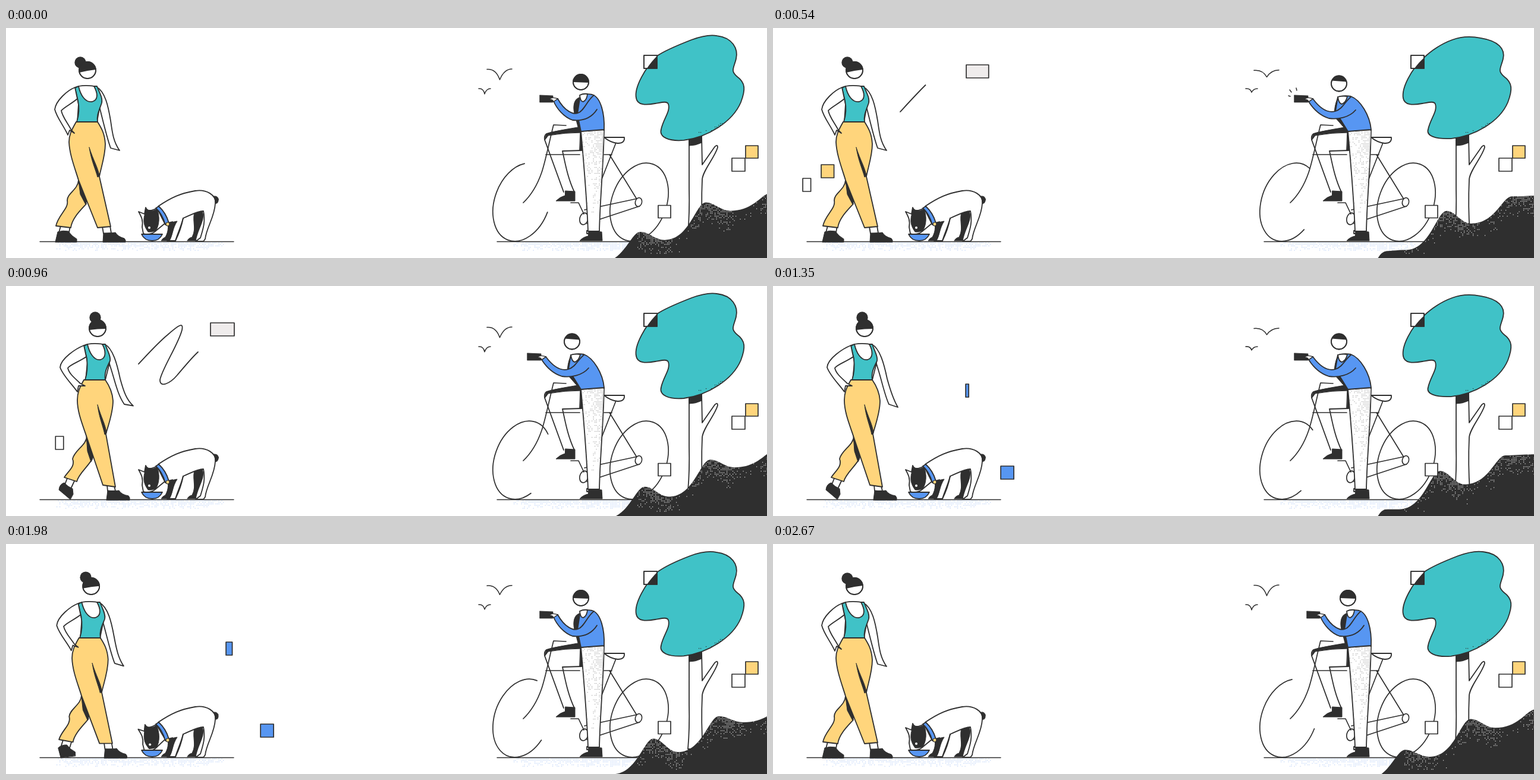
Animation, 1280 px wide and 387 px high, one loop 2.7 s. Source, as an HTML page with a canvas:

```html
<!DOCTYPE html>
<html>
<head>
<meta charset="utf-8">
<style>
html, body { margin: 0; width: 100%; height: 100%; overflow: hidden; background: #fff; }
canvas { display: block; }
</style>
</head>
<body>
<canvas id="stage" width="1280" height="387"></canvas>
<script>
const g = document.getElementById('stage').getContext('2d');
const LOOP = 2700, TAU = Math.PI * 2;
const INK = '#2f2f2f', TEAL = '#40c2c7', SUN = '#ffd57c', BLUE = '#5796f2', PAPER = '#fff';

// Piecewise interpolation over [position, value] pairs.
function key(t, pairs, smooth) {
  if (t <= pairs[0][0]) return pairs[0][1];
  for (let i = 1; i < pairs.length; i++) {
    const [a, u] = pairs[i - 1], [b, v] = pairs[i];
    if (t <= b) {
      let k = (t - a) / (b - a);
      if (smooth) k = k * k * (3 - 2 * k);
      return u + (v - u) * k;
    }
  }
  return pairs[pairs.length - 1][1];
}

const lerp = (a, b, k) => a + (b - a) * k;

// Blend two path strings that share the same commands.
function mix(a, b, k) {
  const other = b.match(/-?[\d.]+/g);
  let i = 0;
  return a.replace(/-?[\d.]+/g, n => lerp(+n, +other[i++], k).toFixed(2));
}

function draw(d, fill, line = 1.8) {
  const p = new Path2D(d);
  if (fill) { g.fillStyle = fill; g.fill(p); }
  if (line) { g.strokeStyle = INK; g.lineWidth = line; g.stroke(p); }
  return p;
}

function oval(x, y, rx, ry, fill, line = 1.8, rot = 0, from = 0, to = TAU) {
  g.beginPath();
  g.ellipse(x, y, rx, ry, rot, from, to);
  if (fill) { g.fillStyle = fill; g.fill(); }
  if (line) { g.strokeStyle = INK; g.lineWidth = line; g.stroke(); }
}

function box(x, y, w, h, fill) {
  if (w < 0.4) return;
  g.fillStyle = fill;
  g.fillRect(x, y, w, h);
  g.lineWidth = 1.7;
  g.strokeStyle = INK;
  g.strokeRect(x, y, w, h);
}

function clipped(path, body) {
  g.save();
  g.clip(path);
  body();
  g.restore();
}

function hash(x, y) {
  const s = Math.sin(x * 12.99 + y * 78.23) * 43758.55;
  return s - Math.floor(s);
}

// Halftone grain; density(x, y) gives the chance of a dot.
function grain(x0, y0, x1, y1, step, color, density) {
  g.fillStyle = color;
  for (let y = y0; y < y1; y += step)
    for (let x = x0; x < x1; x += step)
      if (hash(x, y) < density(x, y)) g.fillRect(x, y, 1.2, 1.2);
}

function head(x, y, r, left, right, bow) {
  oval(x, y, r, r, PAPER);
  const p = new Path2D();
  p.arc(x, y, r, 0, TAU);
  clipped(p, () => draw(`M${x - 20},${y - 20}L${x + 20},${y - 20}L${x + r},${y + right}` +
    `Q${x},${y + (left + right) / 2 + bow} ${x - r},${y + left}L${x - 20},${y + left}Z`, INK, 0));
  oval(x, y, r, r, null);
}

function ground(x0, x1) {
  grain(x0 + 28, 361, x1 - 14, 374, 2.5, '#b9d0f7', (x, y) =>
    Math.min(0.9, (x - x0 - 20) / 40, (x1 - 5 - x) / 40) * (1.05 - (y - 361) / 15));
  draw(`M${x0},359.5L${x1},359.5`, null, 1.4);
}

function woman(k, arm) {
  const m = (a, b, fill, line) => draw(mix(a, b, k), fill, line);
  // ankles and shoes
  m('M92,333L89,344L106,344L108,333Z', 'M104,321L99,334L109,341L116,326Z', PAPER);
  m('M162,334L164,346L177,345L175,333Z', 'M170,335L171,345L184,345L182,336Z', PAPER);
  m('M83,360L87,343Q96,340 105,342Q110,350 119,355L119,360Z',
    'M108,359L89,343Q90,333 98,331Q104,338 112,341Q113,350 120,355L119,360Z', INK, 1);
  m('M163,360L164,345Q174,346 184,344Q188,351 199,354Q202,357 201,360Z',
    'M169,360L171,344Q181,346 190,344Q194,351 206,353Q209,356 208,360Z', INK, 1);
  // trousers
  m('M122,256C121,272 103,278 103,290C106,304 88,314 84,333L109,336C111,320 126,306 135,296Z',
    'M136,252C136,268 115,276 112,291C117,304 104,312 98,322L119,329C122,316 138,304 145,291Z', SUN);
  m('M122,257L125,280L134,297L136,290Z', 'M135,251L137,278L143,296L147,287Z', INK, 1);
  m('M118,158C110,172 106,180 106,192C107,214 116,236 122,256L154,336L176,334L157,250C160,234 167,215 167,195C166,178 161,169 154,158Z',
    'M131,158C123,172 120,180 120,192C120,214 130,236 136,255L163,335L184,338L168,249C172,234 180,214 180,193C179,178 174,168 167,158Z', SUN);
  m('M140,201C143,222 151,239 154,251L157,249C155,235 147,223 140,201Z',
    'M154,200C156,220 164,238 166,250L169,248C168,234 160,221 154,200Z', INK, 1);
  m('M154,240L157,250', 'M165,240L168,249', null);
  // far arm
  const reach = 'M152,99C167,107 172,132 176,156C179,178 181,192 191,206L176,202C170,186 164,160 157,132Z';
  const swung = `M166,98C180,105 187,132 192,156C198,178 203,192 ${210 + arm},${204 - arm * 0.6}L${195 + arm},199C187,182 183,158 174,131Z`;
  draw(mix(reach, swung, k), PAPER);
  // torso
  m('M116,100C124,96 143,96 152,99L158,130L153,158L120,158L122,128Z',
    'M131,100C139,96 158,96 166,99L174,130L167,158L134,158L137,128Z', PAPER);
  m('M116,101L122,98C125,112 133,126 145,124C156,121 154,109 148,98L153,98C157,108 163,118 161,126C157,138 152,147 154,158L119,158C123,146 123,132 121,122Z',
    'M131,101L137,98C140,112 148,126 159,124C169,121 168,109 162,98L167,98C170,108 177,118 175,126C169,138 165,147 167,158L133,158C137,146 137,132 136,122Z', TEAL);
  // near arm
  m('M116,100C103,105 84,122 82,137C86,152 97,164 104,180L107,172L115,177L110,172C104,160 95,150 93,139C98,133 111,127 120,119Z',
    'M131,100C118,105 92,122 91,137C96,151 110,164 120,178L122,168L133,168L125,164C117,156 106,148 104,138C108,132 124,127 135,119Z', PAPER);
  // head
  oval(lerp(125, 150, k), lerp(58, 53, k), 9.7, 9.7, INK, 0);
  head(lerp(137, 154, k), 71, 14, lerp(4, 3, k), lerp(-1, 1, k), -1);
}

function dog(nod, tail) {
  g.save();
  g.translate(351, 290);
  g.rotate(tail);
  draw('M-6,-5Q2,-10 6,-3Q7,6 0,5Z', INK, 1);
  g.restore();
  draw('M330,309C336,322 322,338 319,358L305,358Q308,353 313,352C321,338 313,324 317,311Z', INK, 1.2);
  draw('M256,300C278,285 294,278 318,274C337,271 354,281 352,295C351,318 337,336 335,355L332,359L319,359L327,353C331,340 336,326 332,308C322,308 312,314 298,320C293,338 288,347 285,358L271,358L277,352C280,342 280,334 280,326L268,329Z', PAPER);
  draw('M273,328L288,325C280,337 281,347 275,358L261,358Q264,353 268,352C274,341 272,335 273,328Z', INK, 1);
  draw('M298,320Q294,340 285,358', null);
  g.save();
  g.translate(262, 320);
  g.rotate(nod);
  g.translate(-262, -320);
  draw('M254,303C244,308 238,309 235,302L233,313L223,309C228,318 231,324 229,335L231,346Q242,349 250,343L267,329Z', PAPER);
  draw('M235,303C235,309 249,309 254,304C259,317 258,332 252,341Q245,344 239,343C233,335 230,326 233,315Z', INK, 1);
  oval(241, 336, 2, 2, PAPER, 0);
  g.restore();
  draw('M252,303Q263,313 268,331L274,328Q269,311 257,300Z', BLUE);
  oval(272, 330, 3, 3, SUN, 1.2);
  draw('M228,347L263,347Q258,358 246,358Q233,358 228,347Z', BLUE);
}

function bike(turn) {
  const tilt = -70 * Math.PI / 180, deg = Math.PI / 180;
  oval(868, 293, 68, 46, null, 1.7, tilt, (91 + 43 * turn) * deg, (336.5 + 58 * turn) * deg);
  oval(1065, 293, 68, 46, null, 1.7, tilt);
  draw('M942,164L921,163C914,190 908,222 901,243Q890,275 870,294', null, 1.7);
  draw('M908,213L965,213M1006,213L1019,213M1015,213L1061,288M1026,193L999,262', null, 1.7);
  draw('M1006,184L1040,184Q1041,194 1029,194Q1017,193 1006,184Z', PAPER);
  draw('M1062,287L973,306M1065,300L977,329', null, 1.7);
  oval(1064, 293, 5.5, 7.5, PAPER, 1.7, 0.25);
  oval(972, 321, 7, 10, null, 1.7, 0.25);
  draw('M950,294L963,294L972,313', null, 1.7);
}

function man(k) {
  const m = (a, b, fill, line) => draw(mix(a, b, k), fill, line);
  // raised leg
  draw('M968,168C944,171 922,174 909,178Q905,181 906,188L938,276M936,207L968,206M936,207C941,230 945,253 956,276', null);
  draw('M968,166C944,170 920,174 909,178L906,189L912,181Q940,176 968,176Z', INK, 1);
  draw('M941,274L957,275L957,291L925,291Q932,284 940,282Z', INK, 1);
  draw('M966,172L970,206L965,206Z', INK, 1);
  // standing leg
  draw('M977,341L977,346L997,346L998,341Z', PAPER);
  draw('M980,342L1002,343L1003,358L965,358Q970,352 979,350Z', INK, 1);
  const leg = draw('M967,173L1006,171C1005,230 999,290 998,342L979,342C977,285 972,230 967,173Z', PAPER);
  clipped(leg, () => grain(970, 174, 1006, 330, 2.5, '#a8a8a8', (x, y) =>
    Math.max(0, 1 - (y - 170) / 155) * (x - 966) / 38));
  // torso
  m('M964,117C952,121 954,140 958,151L964,174L971,174L971,128Z',
    'M950,117C946,126 943,139 945,150L966,174L970,174L966,128Z', INK, 1);
  m('M966,113Q976,110 986,112C1001,117 1007,145 1006,171L967,174L961,145Z',
    'M950,116Q961,113 972,115C988,121 1004,147 1006,171L967,174L946,140Z', BLUE);
  m('M965,113Q966,124 971,124Q977,121 978,111Q971,110 965,113Z',
    'M950,116Q952,128 957,128Q964,125 966,115Q957,114 950,116Z', PAPER);
  // arm and camera
  const over = ['M928,119C940,141 955,146 962,143C973,139 977,122 989,113', 'M908,119C922,138 935,143 946,140C958,136 961,125 972,116'];
  const under = 'C985,151 972,157 953,155C938,150 926,135 921,123', under2 = 'C969,151 950,154 935,152C919,147 908,135 901,124';
  m(over[0] + 'L994,137' + under + 'Z', over[1] + 'L980,138' + under2 + 'Z', BLUE, 0);
  m(over[0], over[1], null);
  m('M994,137' + under + 'L928,119', 'M980,138' + under2 + 'L908,119', null);
  m('M898,113L920,114L920,125L898,125Z', 'M877,113L900,114L900,125L877,125Z', INK, 0.8);
  m('M913,121Q918,115 928,119L921,124Q919,119 913,121Z',
    'M893,121Q898,115 908,119L901,124Q899,119 893,121Z', PAPER, 1.4);
  head(lerp(967, 952, k), lerp(91, 93.5, k), 13, lerp(0, -5, k), lerp(1, -3, k), 0);
}

function birds(p) {
  const dip = 2.5 * Math.cos(p * TAU);
  draw(`M809,${70.5 - dip * 0.4}Q824,${69 - dip * 0.4} 830.5,${84.5 + dip}Q838,${70 - dip * 0.4} 851,${70 - dip * 0.4}`, null, 1.5);
  draw(`M795,102Q803,101 805,${109.5 + dip * 0.6}Q808,102 815,102`, null, 1.5);
}

function tree(p) {
  const k = 0.5 - 0.5 * Math.cos((p - 0.05) * TAU);
  draw('M1149,180L1149,270Q1150,310 1147,345L1172,345Q1169,300 1171,255C1172,240 1192,218 1197,201Q1197,195 1192,200L1171,230L1170,180Z', PAPER);
  draw('M1149,185L1170,180L1170,193Q1160,198 1149,198Z', INK, 1);
  const side = 'C1224,68 1218,72 1230,82C1244,92 1244,104 1236,125';
  const cove = 'C1106,152 1118,140 1114,128C1112,122 1100,126 1092,127C1076,130 1062,130 1060,118Z';
  const crown = draw(mix(
    'M1060,118C1056,100 1076,66 1095,47C1108,38 1135,27 1153,20C1172,13 1185,11 1196,13C1222,16 1232,35 1228,52' + side +
    'C1222,158 1180,184 1140,189C1115,191 1098,184 1102,170' + cove,
    'M1060,118C1057,101 1073,70 1095,50C1107,38 1125,26 1142,20C1158,14 1175,14 1190,17C1220,22 1232,35 1228,52' + side +
    'C1222,158 1180,182 1140,186C1115,187 1098,182 1102,170' + cove, k), TEAL);
  clipped(crown, () => grain(1150, 160, 1225, 190, 3, INK, (x, y) =>
    Math.max(0, (x * 0.64 + y - 915) / 35) * 0.6));
  box(1073, 46, 22, 22, PAPER);
  const pane = new Path2D();
  pane.rect(1073, 46, 22, 22);
  clipped(pane, () => { g.fillStyle = INK; g.fill(crown); });
  draw('M1073,46h22v22h-22Z', null, 1.7);
  box(1244, 198, 21, 21, SUN);
  box(1221, 219, 22, 22, PAPER);
}

const CREST = [[960, 420], [1012, 376], [1032, 375], [1067, 343], [1088, 328], [1120, 312], [1132, 308], [1175, 294], [1197, 290], [1245, 283], [1283, 278], [1400, 266]];
const DIP = [[940, 430], [1000, 394], [1021, 387], [1052, 376], [1066, 373], [1107, 357], [1137, 348], [1160, 335], [1172, 330], [1217, 308], [1238, 301], [1274, 283], [1400, 272]];
const FOOT = new Path2D('M1016,390Q1022,377 1032,375L1040,250L1290,250L1290,390Z');

// Swells travel right while the slope they ride on stays put.
function hill(p) {
  const pitch = 110;
  let x = 1067 + pitch * (p - 2), y = key(x, CREST);
  let d = `M${x},500L${x},${y}`;
  const go = (nx, ny, a, b) => {
    d += `C${x + (nx - x) * a},${y} ${nx - (nx - x) * b},${ny} ${nx},${ny}`;
    x = nx;
    y = ny;
  };
  for (let i = 0; i < 5; i++) {
    const top = x;
    go(top + 41, key(top + 41, DIP), 0.35, 0.4);
    go(top + pitch, key(top + pitch, CREST), 0.6, 0.24);
  }
  clipped(FOOT, () => {
    const shape = draw(d + `L${x},500Z`, INK, 0);
    const rim = {};
    grain(1062, 276, 1280, 380, 2.5, '#e4e4e4', (px, py) => {
      if (!g.isPointInPath(shape, px, py)) return 0;
      rim[px] = rim[px] || py;
      const swell = 0.55 + 0.45 * Math.cos((px - 1080 - pitch * p) / pitch * TAU);
      return 0.75 * swell * (1 - (py - rim[px]) / 36);
    });
  });
}

function pixels(t) {
  const grow = (a, b, c, d) => key(t, [[a, 0], [b, 1], [c, 1], [d, 0]], true);
  const at = (t0, x0, speed) => x0 + (t - t0) * speed;
  box(at(540, 81, 0.079), 230, 21.5 * grow(380, 510, 690, 840), 22, SUN);
  box(at(540, 50, 0.079), 253, 13.5 * grow(425, 530, 970, 1090), 22, PAPER);
  box(at(540, 325, 0.045), 62, 40 * grow(400, 565, 1000, 1200), 22, '#efecec');
  box(at(1350, 324, 0.073), 165, 10.5 * grow(1260, 1445, 2080, 2250), 22, BLUE);
  box(at(1350, 383, 0.0715), 303, 22 * grow(1180, 1340, 2080, 2250), 22, BLUE);
}

function scribble(t) {
  const tip = key(t, [[430, 0], [540, 61], [900, 310]]);
  const end = key(t, [[930, 0], [960, 12], [1230, 310]]);
  if (tip - end < 1) return;
  g.save();
  g.setLineDash([tip - end, 999]);
  g.lineDashOffset = -end;
  draw('M214,141C236,117 256,95 272,82C290,66 299,60 296,74C290,98 262,140 259,158C259,172 276,164 288,150C300,136 312,121 323,111', null);
  g.restore();
}

function render(t) {
  const p = t / 900 % 1;
  g.fillStyle = PAPER;
  g.fillRect(0, 0, 1280, 387);
  g.lineJoin = g.lineCap = 'round';

  ground(57, 383);
  scribble(t);
  pixels(t);
  woman(key(t, [[560, 0], [900, 1], [1620, 1], [2230, 0]], true),
    key(t, [[850, 6], [960, 4], [1200, 0]], true));
  dog(key(t, [[1500, 0], [1950, -0.07], [2150, -0.05], [2370, 0.09], [2600, 0]], true),
    0.22 * Math.cos((t - 960) / 450 * TAU));

  ground(826, 1095);
  bike(key(t, [[0, 0], [540, 0.69], [960, 1], [1350, 0.85], [1980, 0.45], [2370, 0.22], [2700, 0]]));
  man(key(t, [[120, 0], [450, 1], [1450, 1], [1880, 0]], true));
  if (t > 480 && t < 640) draw('M869,104L872,108M880,101L881,105M867,114L870,115', null, 1.5);
  birds(p);
  tree(p);
  hill(p);
  box(1097, 298.5, 21, 21, PAPER);
}

const start = performance.now();
function tick() {
  render((performance.now() - start) % LOOP);
  requestAnimationFrame(tick);
}
tick();
</script>
</body>
</html>
```
